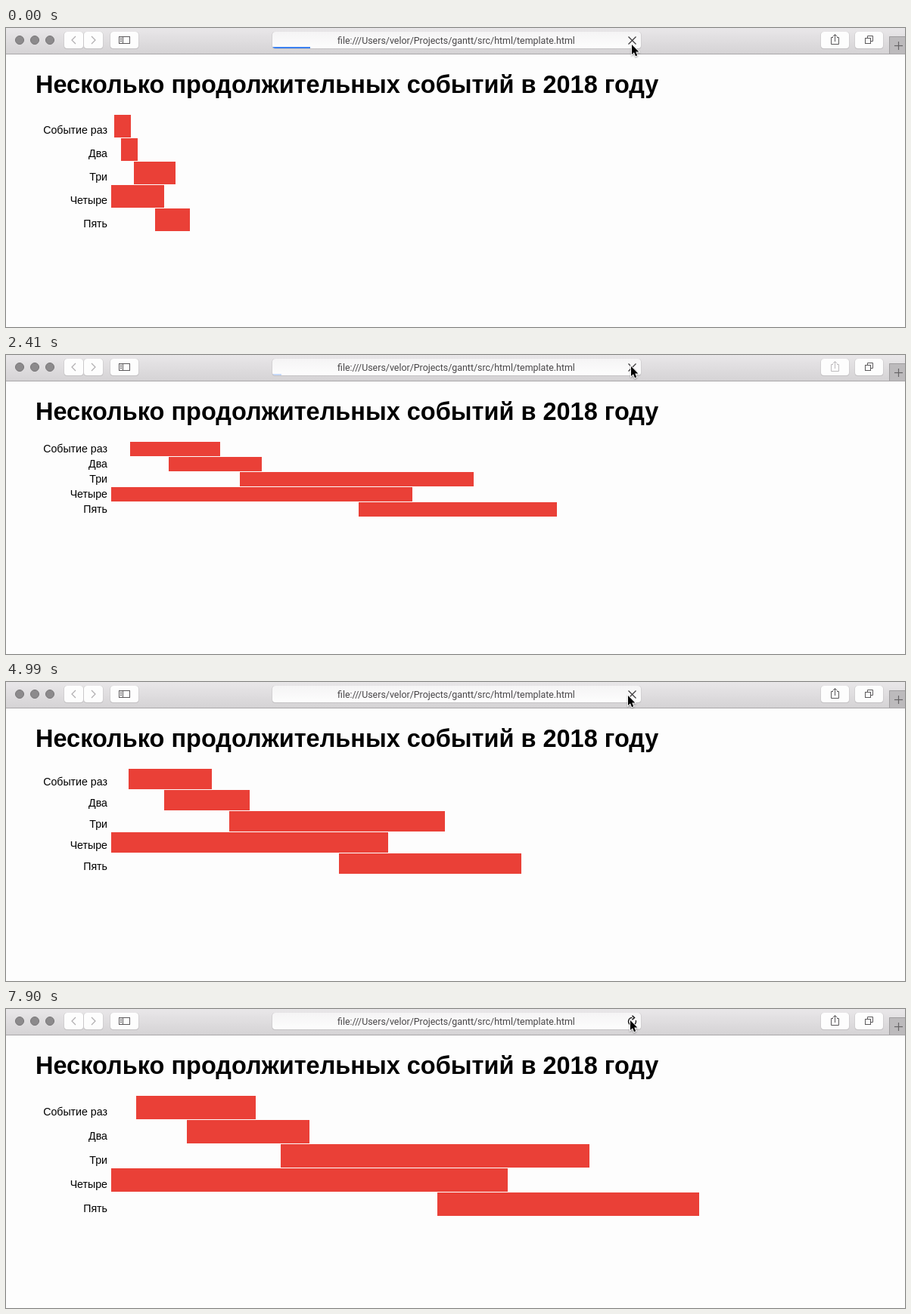
An HTML page with a canvas that plays this animation: 1188 px wide and 396 px high, repeating every 8000 ms.

```html
<!DOCTYPE html>
<html lang="ru">
<head>
<meta charset="utf-8">
<title>Gantt</title>
<style>
  html, body { margin: 0; width: 100%; height: 100%; overflow: hidden; background: #fdfdfd; }
  canvas { display: block; }
</style>
</head>
<body>
<canvas id="stage" width="1188" height="396"></canvas>
<script>
const ctx = document.getElementById('stage').getContext('2d');
const LOOP = 8000;
const SANS = '"Liberation Sans", Arial, sans-serif';
const UI = 'Roboto, "Open Sans", sans-serif';

// Label, start and end as a share of the chart width
const events = [
  ['Событие раз', 0.0429, 0.2453],
  ['Два', 0.1286, 0.3375],
  ['Три', 0.288, 0.813],
  ['Четыре', 0, 0.675],
  ['Пять', 0.555, 1]
];

// Every page reload: button press, start of loading, resulting chart
const loads = [
  { press: -400, start: -250, pitch: 31, width: 104, dim: false },
  { press: 1060, start: 1210, pitch: 35, width: 380, dim: true },
  { press: 2290, start: 2350, pitch: 20, width: 589, dim: true },
  { press: 3710, start: 3765, pitch: 28, width: 542, dim: false },
  { press: 4810, start: 4990, pitch: 25, width: 194, dim: true },
  { press: 5950, start: 6120, pitch: 21, width: 1003, dim: true },
  { press: 7100, start: 7190, pitch: 32, width: 777, dim: true },
  { press: 7900, start: 8100, pitch: 32, width: 777, dim: false }
];

// Pointer stops: time, x, y
const stops = [
  [0, 827, 21], [60, 827, 21], [310, 840, 38], [630, 840, 38], [950, 828, 17],
  [1470, 828, 17], [1690, 836, 34], [1930, 826, 14], [3120, 826, 14],
  [3300, 833, 18], [3470, 826, 14], [3920, 826, 14], [4170, 836, 22],
  [4460, 822, 17], [6180, 822, 17], [6560, 850, 36], [6790, 850, 36],
  [7070, 825, 14], [LOOP, 825, 14]
];

const clamp = v => Math.max(0, Math.min(1, v));
const ramp = (t, a, b) => clamp((t - a) / (b - a));
const smooth = k => k * k * (3 - 2 * k);

function pointerAt(t) {
  let i = 0;
  while (i < stops.length - 2 && t >= stops[i + 1][0]) i++;
  const [t0, x0, y0] = stops[i], [t1, x1, y1] = stops[i + 1];
  const k = smooth(ramp(t, t0, t1));
  return [Math.round(x0 + (x1 - x0) * k), Math.round(y0 + (y1 - y0) * k)];
}

function text(str, x, y, font, align = 'left', color = '#000') {
  ctx.font = font;
  ctx.textAlign = align;
  ctx.fillStyle = color;
  ctx.fillText(str, x, y);
}

function line(points, color, width = 1) {
  ctx.beginPath();
  points.forEach(([x, y]) => ctx.lineTo(x, y));
  ctx.strokeStyle = color;
  ctx.lineWidth = width;
  ctx.stroke();
}

function roundBox(x, y, w, h, fill) {
  ctx.beginPath();
  ctx.roundRect(x, y, w, h, 4);
  ctx.fillStyle = fill;
  ctx.fill();
}

function button(x, w, fill = '#fdfdfd') {
  roundBox(x - 0.5, 5, w + 1, 23, '#c3c1c3');
  roundBox(x, 5, w, 22, fill);
}

function drawToolbar(shareColor) {
  const bar = ctx.createLinearGradient(0, 0, 0, 34);
  bar.addColorStop(0, '#e9e7e9');
  bar.addColorStop(1, '#d5d3d5');
  ctx.fillStyle = bar;
  ctx.fillRect(0, 0, 1188, 34);
  ctx.fillStyle = '#a9a7a9';
  ctx.fillRect(0, 34, 1188, 1);

  for (const x of [18, 38, 58]) {
    ctx.beginPath();
    ctx.arc(x, 16, 5.5, 0, 7);
    ctx.fillStyle = '#8c8a8c';
    ctx.fill();
    ctx.strokeStyle = '#777577';
    ctx.lineWidth = 1;
    ctx.stroke();
  }

  button(77, 25);
  button(103, 25);
  line([[92, 11], [87, 16], [92, 21]], '#b0aeb0', 1.2);
  line([[113, 11], [118, 16], [113, 21]], '#b0aeb0', 1.2);

  button(138, 37);
  const ink = '#5c5a5c';
  ctx.strokeStyle = ink;
  ctx.lineWidth = 1;
  ctx.strokeRect(149.5, 11.5, 14, 9);
  line([[154.5, 11], [154.5, 21]], ink);
  for (const y of [13.5, 15.5, 17.5]) line([[151, y], [153, y]], ink);

  button(1077, 37);
  line([[1093, 12.5], [1090.5, 12.5], [1090.5, 21.5], [1100.5, 21.5], [1100.5, 12.5], [1098, 12.5]], shareColor);
  line([[1095.5, 9], [1095.5, 18]], shareColor);
  line([[1092.5, 11.5], [1095.5, 8.5], [1098.5, 11.5]], shareColor);

  button(1122, 37);
  ctx.strokeStyle = ink;
  ctx.strokeRect(1135.5, 13.5, 7, 7);
  line([[1138.5, 13], [1138.5, 10.5], [1145.5, 10.5], [1145.5, 17.5], [1143, 17.5]], ink);

  ctx.fillStyle = '#bcbabc';
  ctx.fillRect(1167, 11, 21, 23);
  line([[1188, 11.5], [1167.5, 11.5], [1167.5, 34]], '#a09ea0');
  line([[1174, 23.5], [1185, 23.5]], '#666466', 1.2);
  line([[1179.5, 18], [1179.5, 29]], '#666466', 1.2);
}

function drawReload(pressed) {
  const color = pressed ? '#111' : '#6a686a';
  ctx.beginPath();
  ctx.arc(827.5, 16.5, 5, -0.3, Math.PI * 1.5);
  ctx.strokeStyle = color;
  ctx.lineWidth = pressed ? 1.3 : 1.1;
  ctx.stroke();
  line([[827.5, 8.8], [830.5, 11.5], [827.5, 14.2]], color, pressed ? 1.5 : 1.1);
}

function drawAddress(age, pressed) {
  const face = ctx.createLinearGradient(0, 5, 0, 27);
  face.addColorStop(0, '#f5f4f5');
  face.addColorStop(1, '#fdfdfd');
  button(352, 487, face);
  text('file:///Users/velor/Projects/gantt/src/html/template.html', 595, 21, '12.4px ' + UI, 'center', '#484648');

  if (age >= 0 && age < 660) {
    const w = 12 + 38 * ramp(age, 80, 250) + 437 * smooth(ramp(age, 260, 500));
    ctx.save();
    ctx.beginPath();
    ctx.roundRect(352, 5, 487, 22, 4);
    ctx.clip();
    ctx.globalAlpha = ramp(age, 30, 140) * (1 - ramp(age, 500, 660));
    ctx.fillStyle = '#3a80f0';
    ctx.fillRect(352, 25, w, 2);
    ctx.restore();
  }

  if (age >= 0 && age < 450) {
    line([[822.5, 11.5], [832.5, 21.5]], '#3c3a3c', 1.2);
    line([[832.5, 11.5], [822.5, 21.5]], '#3c3a3c', 1.2);
  } else {
    drawReload(pressed);
  }
}

function drawPage({ pitch, width }) {
  text('Несколько продолжительных событий в 2018 году', 39, 86, 'bold 32.5px ' + SANS);
  const edge = share => Math.round(139 + share * width);
  events.forEach(([label, from, to], i) => {
    const y = 115 + i * pitch;
    text(label, 134, y + pitch - 6, '14.2px ' + SANS, 'right');
    ctx.fillStyle = '#ea4037';
    ctx.fillRect(edge(from), y, edge(to) - edge(from), pitch - 1);
  });
}

function drawPointer([x, y]) {
  ctx.save();
  ctx.translate(x, y + 1);
  ctx.beginPath();
  [[0, 0], [0, 13], [3, 10.3], [5, 15.2], [7.2, 14.2], [5.2, 9.5], [9.3, 9.5]]
    .forEach(([px, py]) => ctx.lineTo(px, py));
  ctx.closePath();
  ctx.shadowColor = 'rgba(0,0,0,.35)';
  ctx.shadowBlur = 2;
  ctx.shadowOffsetY = 1;
  ctx.strokeStyle = '#fff';
  ctx.lineWidth = 1.8;
  ctx.stroke();
  ctx.shadowColor = 'transparent';
  ctx.fillStyle = '#000';
  ctx.fill();
  ctx.restore();
}

function draw(t) {
  const load = loads.filter(l => t >= l.start).pop();
  const chart = loads.filter(l => t >= l.start + 45).pop();
  const pressed = loads.some(l => t >= l.press && t < l.start);
  const age = t - load.start;
  const dimmed = load.dim && age >= 40 && age < 190;

  ctx.fillStyle = '#fdfdfd';
  ctx.fillRect(0, 0, 1188, 396);
  drawPage(chart);
  drawToolbar(dimmed ? '#bebcbe' : '#5c5a5c');
  drawAddress(age, pressed);
  drawPointer(pointerAt(t));
}

const begin = performance.now();
function tick() {
  draw((performance.now() - begin) % LOOP);
  requestAnimationFrame(tick);
}
tick();
</script>
</body>
</html>
```
